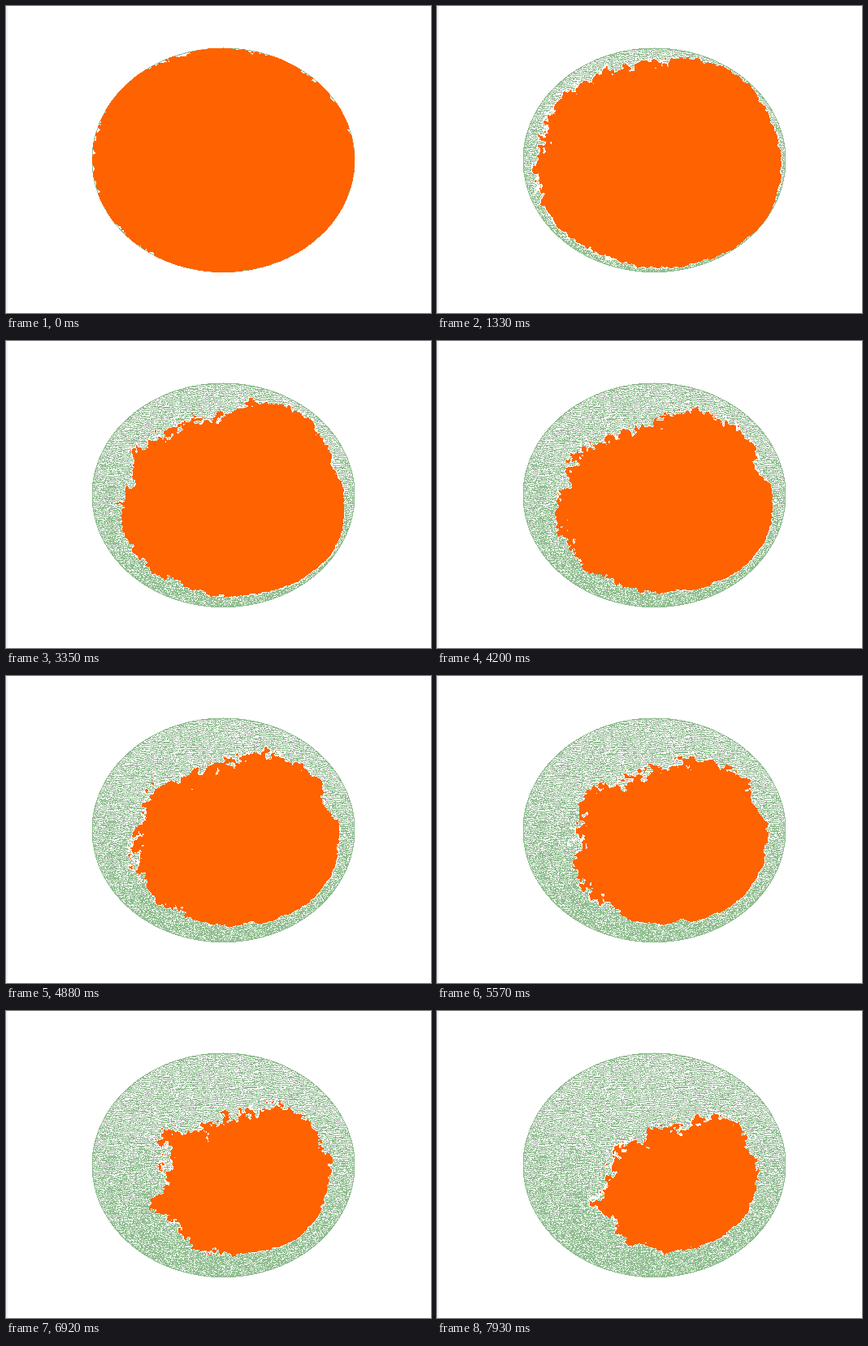
An HTML page with a canvas that plays this animation: 523 px wide and 378 px high, repeating every 8 s.

```html
<!DOCTYPE html>
<html lang="en">
<head>
<meta charset="utf-8">
<title>Burning disc</title>
<style>
  html, body { margin: 0; width: 100%; height: 100%; overflow: hidden; background: #fff; }
  canvas { display: block; width: 523px; height: 378px; image-rendering: pixelated; }
</style>
</head>
<body>
<canvas id="stage" width="523" height="378"></canvas>
<script>
const W = 523, H = 378, LOOP = 8000;
const ctx = document.getElementById('stage').getContext('2d');
const image = ctx.createImageData(W, H);
const pixels = new Uint32Array(image.data.buffer);

const rgb = (r, g, b) => (255 << 24 | b << 16 | g << 8 | r) >>> 0;
const WHITE = rgb(255, 255, 255), ORANGE = rgb(255, 98, 0), BAR = rgb(240, 240, 240);
const GREEN = rgb(143, 188, 143), PALE = rgb(192, 232, 192), MAUVE = rgb(186, 174, 186);

const disc = { x: 267, y: 189.3, rx: 162, ry: 138.3 };
const core = { x: 300, y: 210 };

// Front distance from the core, every 15 degrees clockwise from the right.
const frontTimes = [0, 2510, 4200, 6920, 7930];
const fronts = [
  [118, 117, 116, 109, 106, 103, 105, 111, 118, 127, 146, 158,
   167, 158, 166, 150, 140, 129, 142, 140, 142, 130, 124, 121],
  [111, 110, 105, 102, 97, 97, 97, 104, 110, 120, 139, 145,
   153, 143, 146, 126, 118, 114, 125, 128, 125, 122, 106, 115],
  [97, 95, 92, 91, 89, 86, 87, 92, 97, 107, 107, 126,
   102, 103, 120, 84, 87, 83, 82, 98, 101, 105, 97, 103],
  [94, 90, 89, 85, 84, 83, 83, 88, 90, 100, 94, 108,
   87, 87, 90, 69, 78, 69, 65, 80, 92, 99, 90, 97]
];

function hash(x, y, seed) {
  let h = Math.imul(x, 374761393) ^ Math.imul(y, 668265263) ^ Math.imul(seed, 1274126177);
  h = Math.imul(h ^ h >>> 13, 1274126177);
  h = Math.imul(h ^ h >>> 15, 2246822519);
  return ((h ^ h >>> 16) >>> 0) / 4294967296;
}

const mix = (a, b, t) => a + (b - a) * t;

function noise(x, y, size, seed) {
  const gx = x / size, gy = y / size, ix = Math.floor(gx), iy = Math.floor(gy);
  const ease = t => t * t * (3 - 2 * t), fx = ease(gx - ix), fy = ease(gy - iy);
  const row = j => mix(hash(ix, j, seed), hash(ix + 1, j, seed), fx);
  return mix(row(iy), row(iy + 1), fy) * 2 - 1;
}

// Distance from the core to the disc's rim along a direction.
function rimDistance(angle) {
  const ux = Math.cos(angle) / disc.rx, uy = Math.sin(angle) / disc.ry;
  const ox = (core.x - disc.x) / disc.rx, oy = (core.y - disc.y) / disc.ry;
  const a = ux * ux + uy * uy, b = ux * ox + uy * oy, c = ox * ox + oy * oy - 1;
  return (-b + Math.sqrt(b * b - a * c)) / a;
}

function frontDistance(radii, angle) {
  const turn = (angle / (2 * Math.PI) + 1) % 1 * 24, i = Math.floor(turn);
  return mix(radii[i % 24], radii[(i + 1) % 24], turn - i);
}

function burnTime(x, y, angle, r, rim) {
  const rough = 0.6 - 0.4 * Math.cos(angle - Math.PI / 4);
  const reach = rough * Math.min(12, 4 + (rim - r) * 0.2);
  const jitter = noise(x, y, 10, 1) * 0.75 + noise(x, y, 4, 2) * 0.75
    + (hash(x >> 1, y >> 1, 3) - 0.5) * 0.4;
  const d = r + reach * jitter;
  if (d >= rim) return 0;
  let outer = rim;
  for (let i = 0; i < fronts.length; i++) {
    const inner = frontDistance(fronts[i], angle);
    if (d >= inner) return mix(frontTimes[i], frontTimes[i + 1], (outer - d) / (outer - inner));
    outer = inner;
  }
  return Infinity;
}

// Wavy one-pixel stripes, denser towards the bottom.
function ashColor(x, y, rimDepth) {
  if (rimDepth < 1.1) return GREEN;
  const low = Math.min(1, Math.max(0, (y - 130) / 180));
  const wave = Math.round(noise(x, y, 7, 4) * 2.2);
  const pick = hash(x, y, 5);
  if (y + wave & 1) {
    if (pick < 0.18 * (1 - low)) return MAUVE;
    return pick < 0.9 ? GREEN : WHITE;
  }
  if (pick < 0.1 + 0.38 * low) return GREEN;
  return pick > 0.83 ? PALE : WHITE;
}

const cells = [];
for (let y = 50; y < 330; y++) {
  for (let x = 104; x < 431; x++) {
    const dx = x - core.x, dy = y - core.y;
    const angle = Math.atan2(dy, dx), r = Math.hypot(dx, dy), rim = rimDistance(angle);
    if (r > rim) continue;
    cells.push({
      index: y * W + x,
      burn: burnTime(x, y, angle, r, rim),
      ash: ashColor(x, y, rim - r),
      rim: rim - r < 1.1
    });
  }
}

// The picture holds between steps; blocks of seven steps begin at these times.
const blocks = [160, 1330, 2510, 3690, 4880, 6070, 7250];
function stepTime(t) {
  const start = blocks.filter(b => b <= t).pop();
  return start === undefined ? 0 : start + Math.min(6, Math.floor((t - start) / 169)) * 169;
}

function draw(time) {
  pixels.fill(WHITE);
  for (let y = 0; y < H; y++) pixels[y * W] = pixels[y * W + 1] = BAR;
  for (const cell of cells) {
    const age = time - cell.burn;
    pixels[cell.index] = age < 0 ? ORANGE : age < 190 && !cell.rim ? WHITE : cell.ash;
  }
  ctx.putImageData(image, 0, 0);
}

let shown = -1;
const began = performance.now();
function tick() {
  const time = stepTime((performance.now() - began) % LOOP);
  if (time !== shown) draw(shown = time);
  requestAnimationFrame(tick);
}
tick();
</script>
</body>
</html>
```
